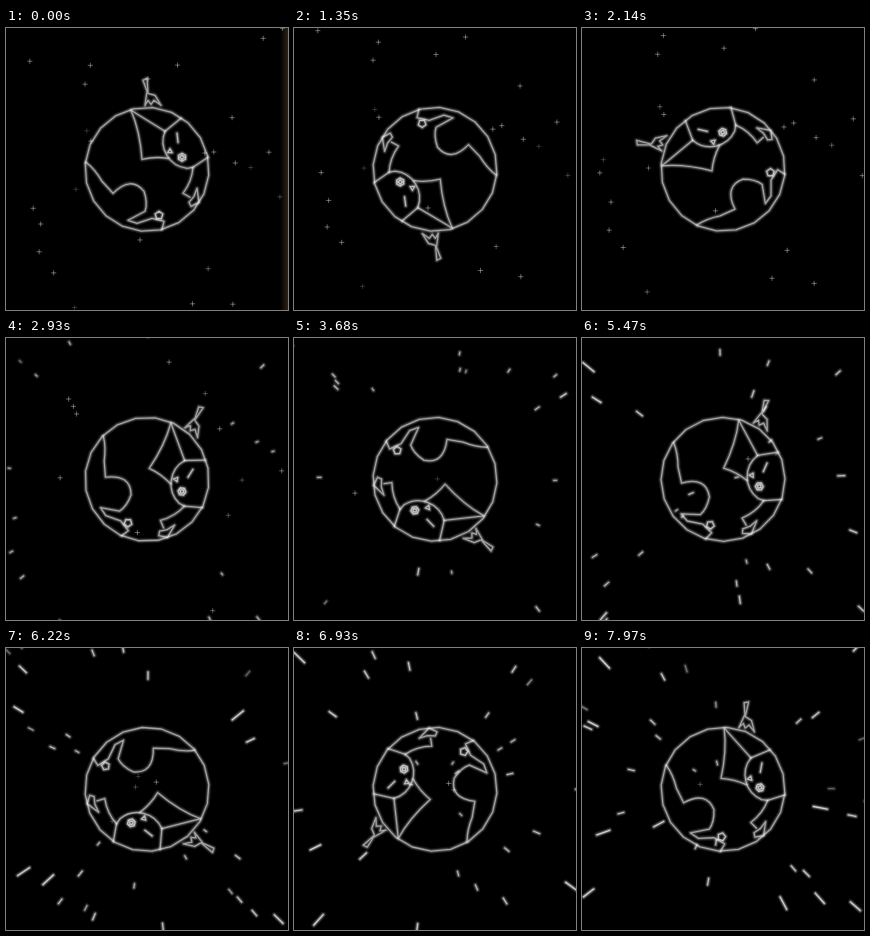
Animation, 282 px wide and 282 px high, one loop 8 s. Source, as an HTML page with a canvas:

```html
<!DOCTYPE html>
<html lang="en">
<head>
<meta charset="utf-8">
<title>Spinning globe</title>
<style>
  html, body { margin: 0; width: 100%; height: 100%; overflow: hidden; background: #000; }
  canvas { display: block; width: 100vw; height: 100vh; }
</style>
</head>
<body>
<canvas id="stage"></canvas>
<script>
const SIZE = 282, LOOP = 8000, CX = 141, CY = 141.3, RADIUS = 62;
const TURN = 5.77 * Math.PI / 180;
const DRIFT_STEPS = 31, ACCEL = 2.5e-4;
const STAR_COUNT = 88, NEAR_STARS = 36, SPREAD = 290;

const canvas = document.getElementById('stage');
const ctx = canvas.getContext('2d');
const ratio = window.devicePixelRatio || 1;
canvas.width = canvas.height = SIZE * ratio;

// All globe shapes are relative to the globe's centre
function polygon(x, y, radius, sides, phase = 0) {
  const path = new Path2D();
  for (let i = 0; i < sides; i++) {
    const a = (i + phase) * 2 * Math.PI / sides;
    path.lineTo(x + radius * Math.sin(a), y - radius * Math.cos(a));
  }
  path.closePath();
  return path;
}

const rim = polygon(0, 0, RADIUS, 20, 0.3);
const upperCoast = new Path2D('M18 -38 L-16 -59 Q-7 -38 -5 -10 Q8 -13 21 -11');
const rightCoast = new Path2D('M34 -51 L18 -38 A27 27 0 0 0 40 -1 L46 -2 61 -12');
const peninsula = new Path2D('M46 -2 Q45 12 36 24 L43 28 M50 19 L52 33 44 37 42 33 47 27 Z');
const leftCoast = new Path2D(
  'M-61 -7 Q-52 0 -45 12 L-34 24 Q-16 6 -3 22 Q1 34 -2 42 L-19 51 -10 54 5 49 17 52 15 60');
const giraffe = new Path2D('M-4 -89 L0 -91 1 -76 8 -74 14 -64 7 -69 4 -65 1 -69 -2 -64 0 -78 Z');
const coasts = [rim, upperCoast, rightCoast, peninsula, leftCoast, giraffe];

const lakes = [
  polygon(35, -12, 4, 6),
  polygon(35, -12, 2, 4),
  polygon(23, -18, 2.5, 3),
  polygon(12, 46, 4, 5),
  new Path2D('M30 -36 L31 -27')
];

function random(seed) {
  const v = Math.sin(seed * 127.1 + 11.7) * 43758.5453;
  return v - Math.floor(v);
}

function glowStroke(path, level = 1) {
  for (const [width, alpha] of [[5.4, 0.09], [3.2, 0.2], [1.3, 0.5]]) {
    ctx.lineWidth = width;
    ctx.strokeStyle = `rgba(255,255,255,${alpha * level})`;
    ctx.stroke(path);
  }
}

function drawTwinkle(x, y, alpha) {
  ctx.lineWidth = 1;
  ctx.strokeStyle = `rgba(255,255,255,${alpha})`;
  ctx.beginPath();
  ctx.moveTo(x - 2.2, y);
  ctx.lineTo(x + 2.2, y);
  ctx.moveTo(x, y - 2.2);
  ctx.lineTo(x, y + 2.2);
  ctx.stroke();
}

function drawStreak(x, y, tail, level) {
  const path = new Path2D();
  path.moveTo(CX + x, CY + y);
  path.lineTo(CX + x * (1 - tail), CY + y * (1 - tail));
  glowStroke(path, level);
}

// Stars drift upwards, then fly past with steady acceleration
function drawStars(step) {
  const drift = Math.min(step, DRIFT_STEPS);
  const speed = ACCEL * Math.max(0, step - DRIFT_STEPS);
  const travelled = speed * speed / (2 * ACCEL);

  for (let i = 0; i < STAR_COUNT; i++) {
    const start = i < NEAR_STARS ? 0.55 + 0.45 * random(i + 3) : 1 + random(i + 3);
    const depth = start - travelled;
    if (depth > 1) continue;
    const lap = Math.max(0, 1 - Math.ceil(depth));
    const z = Math.max(0.02, depth + lap);
    const x = (random(i * 2.3 + lap * 17 + 0.4) - 0.5) * SPREAD / z;
    const y = ((random(i * 3.7 + lap * 29 + 0.8) - 0.5) * SPREAD - drift * 0.68) / z;
    if (Math.max(Math.abs(x), Math.abs(y)) > SIZE * 0.57) continue;

    const radius = Math.hypot(x, y);
    const length = Math.min(14, 1.2 * radius * speed / z);
    const fade = Math.min(1, (1.05 - z) * 8);
    if (length < 1.8) drawTwinkle(CX + x, CY + y, 0.38 * fade);
    else drawStreak(x, y, length / radius, Math.min(1.4, 0.9 + length * 0.05) * fade);
  }
}

// A dim worn edge that vanishes as the scene opens
function drawEdge(step) {
  const alpha = 0.4 * Math.max(0, 1 - step / 8);
  const shade = ctx.createLinearGradient(SIZE - 8, 0, SIZE, 0);
  shade.addColorStop(0, 'rgba(110,85,60,0)');
  shade.addColorStop(1, `rgba(110,85,60,${alpha})`);
  ctx.fillStyle = shade;
  ctx.fillRect(SIZE - 8, 0, 8, SIZE);
}

function drawGlobe(step) {
  ctx.save();
  ctx.translate(CX, CY);
  ctx.rotate(step * TURN);
  coasts.forEach(path => glowStroke(path));
  lakes.forEach(path => glowStroke(path, 1.2));
  ctx.restore();
}

const startTime = performance.now();

function render(now) {
  const time = Math.max(0, now - startTime) % LOOP;
  // 24 poses per second on a 10 ms clock, after a 100 ms hold
  const step = Math.ceil(Math.max(0, Math.floor(time / 10) * 10 - 90) * 0.024);
  ctx.setTransform(ratio, 0, 0, ratio, 0, 0);
  ctx.lineJoin = ctx.lineCap = 'round';
  ctx.fillStyle = '#000';
  ctx.fillRect(0, 0, SIZE, SIZE);
  drawEdge(step);
  drawStars(step);
  drawGlobe(step);
  requestAnimationFrame(render);
}

render(startTime);
</script>
</body>
</html>
```
